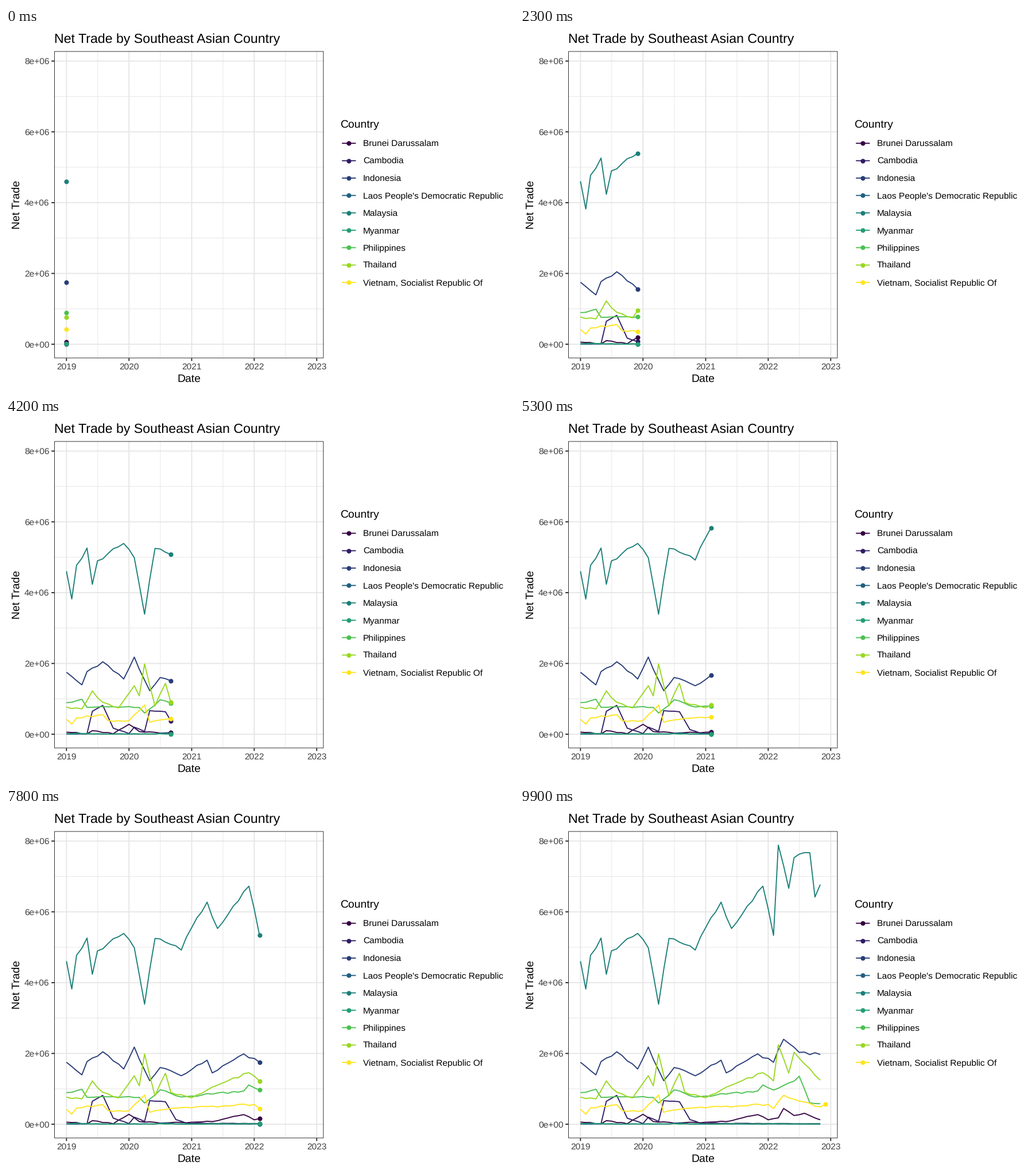
A matplotlib script for the animation above (10000 ms loop, 885 by 632 pixels).

```python
import numpy as np
import matplotlib.pyplot as plt
from matplotlib.animation import FuncAnimation
from matplotlib.patches import Rectangle

W, H, DPI = 885, 632, 64
PX = 72 / DPI                 # one pixel in points
FRAMES, STEP = 100, 100
TEXT, HEAD, TITLE = 15.46, 19.33, 23.19
LINE, DOT = 1.87, 8.1
GRID, INK, LABEL = "#e6e6e6", "#262626", "#404040"
LEFT, RIGHT, TOP, BOTTOM = 84.0, 553.4, 40.5, 576.5
ROW = 30.36                   # legend row height

plt.rcParams.update({"font.family": "Liberation Sans", "text.hinting": "none"})
rng = np.random.default_rng(4)

# Month starts as days, and the frame at which each month is reached
months = np.arange("2019-01", "2023-01", dtype="datetime64[M]")
days = (months.astype("datetime64[D]") - np.datetime64("2019-01-01")).astype(float)
reach = np.round((FRAMES - 1) * days / days[-1])


def px_x(day):
    return 105.35 + np.asarray(day) * 0.2984


def px_y(thousands):
    return 552.1 - np.asarray(thousands) * 0.0618


def wander(turns, jitter, last=46):
    """Monthly values through the turning points, with a slight wobble between."""
    month = np.arange(last + 1)
    values = np.interp(month, list(turns), list(turns.values()))
    wobble = rng.uniform(-jitter, jitter, last + 1)
    wobble[[m for m in turns if m <= last]] = 0
    return np.maximum(values + wobble, 2)


# Name, colour and turning points (month: thousands)
series = [
    ("Brunei Darussalam", "#350042", wander(
        {0: 60, 4: 12, 5: 100, 9: 14, 12: 280, 14: 75, 18: 30, 28: 75,
         34: 272, 36: 125, 38: 180, 39: 445, 41: 246, 43: 310, 46: 125}, 15)),
    ("Cambodia", "#301b66", wander(
        {0: 12, 4: 15, 5: 648, 7: 815, 9: 172, 12: 18, 13: 200, 15: 78,
         16: 665, 19: 635, 21: 130, 23: 28, 46: 16}, 8)),
    ("Indonesia", "#283d78", wander(
        {0: 1750, 3: 1395, 4: 1770, 7: 2047, 11: 1560, 13: 2180, 16: 1230, 18: 1602,
         22: 1370, 27: 1810, 28: 1450, 34: 1988, 37: 1750, 39: 2400, 42: 2030,
         46: 1970}, 40)),
    ("Laos People's Democratic Republic", "#1f6080", wander(
        {0: 4, 17: 4, 19: 40, 21: 4}, 4)),
    ("Malaysia", "#1b7f79", wander(
        {0: 4605, 1: 3820, 2: 4775, 4: 5260, 5: 4235, 6: 4900, 11: 5390, 13: 4985,
         15: 3390, 17: 5250, 22: 4920, 24: 5555, 27: 6275, 29: 5530, 35: 6725,
         37: 5335, 38: 7885, 40: 6665, 41: 7530, 44: 7670, 45: 6420, 46: 6770}, 60)),
    ("Myanmar", "#239f73", wander({0: 10, 2: 30, 5: 10}, 6)),
    ("Philippines", "#4bc14f", wander(
        {0: 893, 3: 988, 4: 760, 14: 757, 15: 600, 18: 972, 22: 770, 34: 940,
         35: 1110, 37: 965, 41: 1217, 42: 1357, 44: 605, 46: 580}, 25)),
    ("Thailand", "#98d81f", wander(
        {0: 768, 3: 715, 5: 1225, 7: 902, 10: 745, 13: 1370, 14: 1085, 15: 1985, 17: 800,
         19: 1440, 20: 905, 24: 748, 31: 1228, 35: 1455, 37: 1222, 38: 2245, 40: 1443,
         41: 2035, 46: 1245}, 30)),
    ("Vietnam, Socialist Republic Of", "#ffe41c", wander(
        {0: 420, 1: 285, 2: 460, 7: 553, 8: 385, 12: 382, 15: 825, 16: 338, 21: 455,
         36: 560, 37: 442, 39: 820, 41: 706, 46: 490, 47: 567}, 25, last=47)),
]

fig = plt.figure(figsize=(W / DPI, H / DPI), dpi=DPI, facecolor="white")
ax = fig.add_axes([0, 0, 1, 1])
ax.set(xlim=(0, W), ylim=(H, 0))
ax.axis("off")


def stroke(xs, ys, color, width=LINE, z=1):
    return ax.plot(xs, ys, color=color, lw=width * PX, zorder=z, snap=False,
                   solid_capstyle="butt", solid_joinstyle="round")[0]


def dot(xs, ys, color, z):
    return ax.plot(xs, ys, "o", color=color, ms=DOT * PX, mew=0, zorder=z, snap=False)[0]


def label(x, y, text, size=TEXT, color="black", ha="left", **kw):
    ax.text(x, y, text, fontsize=size * PX, color=color, ha=ha, va="baseline", **kw)


# Grid, ticks and axis labels
year_x = px_x([0, 365, 731, 1096, 1461])
for x in (year_x[:-1] + year_x[1:]) / 2:
    stroke([x, x], [TOP, BOTTOM], GRID, LINE / 2)
for v in range(1000, 8000, 2000):
    stroke([LEFT, RIGHT], [px_y(v)] * 2, GRID, LINE / 2)
for i, x in enumerate(year_x):
    stroke([x, x], [TOP, BOTTOM], GRID)
    stroke([x, x], [BOTTOM, BOTTOM + 4.84], INK)
    label(x, 596, str(2019 + i), color=LABEL, ha="center")
for m in range(0, 9, 2):
    y = px_y(m * 1000)
    stroke([LEFT, RIGHT], [y, y], GRID)
    stroke([LEFT - 4.84, LEFT], [y, y], INK)
    label(75.6, y + 5.4, f"{m}e+0{6 if m else 0}", color=LABEL, ha="right")

edge = LINE / 2
ax.add_patch(Rectangle((LEFT + edge / 2, TOP + edge / 2), RIGHT - LEFT - edge,
                       BOTTOM - TOP - edge, fill=False, ec=INK, lw=edge * PX,
                       zorder=30, snap=False))
label(LEFT, 26, "Net Trade by Southeast Asian Country", TITLE)
label((LEFT + RIGHT) / 2, 618, "Date", HEAD, ha="center")
label(23.4, (TOP + BOTTOM) / 2, "Net Trade", HEAD, ha="center",
      rotation=90, rotation_mode="anchor")

# Legend
label(581.6, 174, "Country", HEAD)
for i, (name, color, _) in enumerate(series):
    y = 201.3 + ROW * i
    stroke([585.2, 609.5], [y, y], color)
    dot([597.3], [y], color, 2)
    label(622, y + 5.4, name)

tracks = []
for i, (_, color, values) in enumerate(series):
    n = len(values)
    tracks.append((reach[:n], px_x(days[:n]), px_y(values),
                   stroke([], [], color, z=5 + i), dot([], [], color, 15 + i)))


def draw(frame):
    artists = []
    for at, xs, ys, line, head in tracks:
        past = at <= frame
        x, y = np.interp(frame, at, xs), np.interp(frame, at, ys)
        line.set_data(np.append(xs[past], x), np.append(ys[past], y))
        head.set_data([x], [y])
        head.set_visible(frame <= at[-1])
        artists += [line, head]
    return artists


anim = FuncAnimation(fig, draw, frames=FRAMES, interval=STEP, repeat=True, repeat_delay=0)
plt.show()
```
